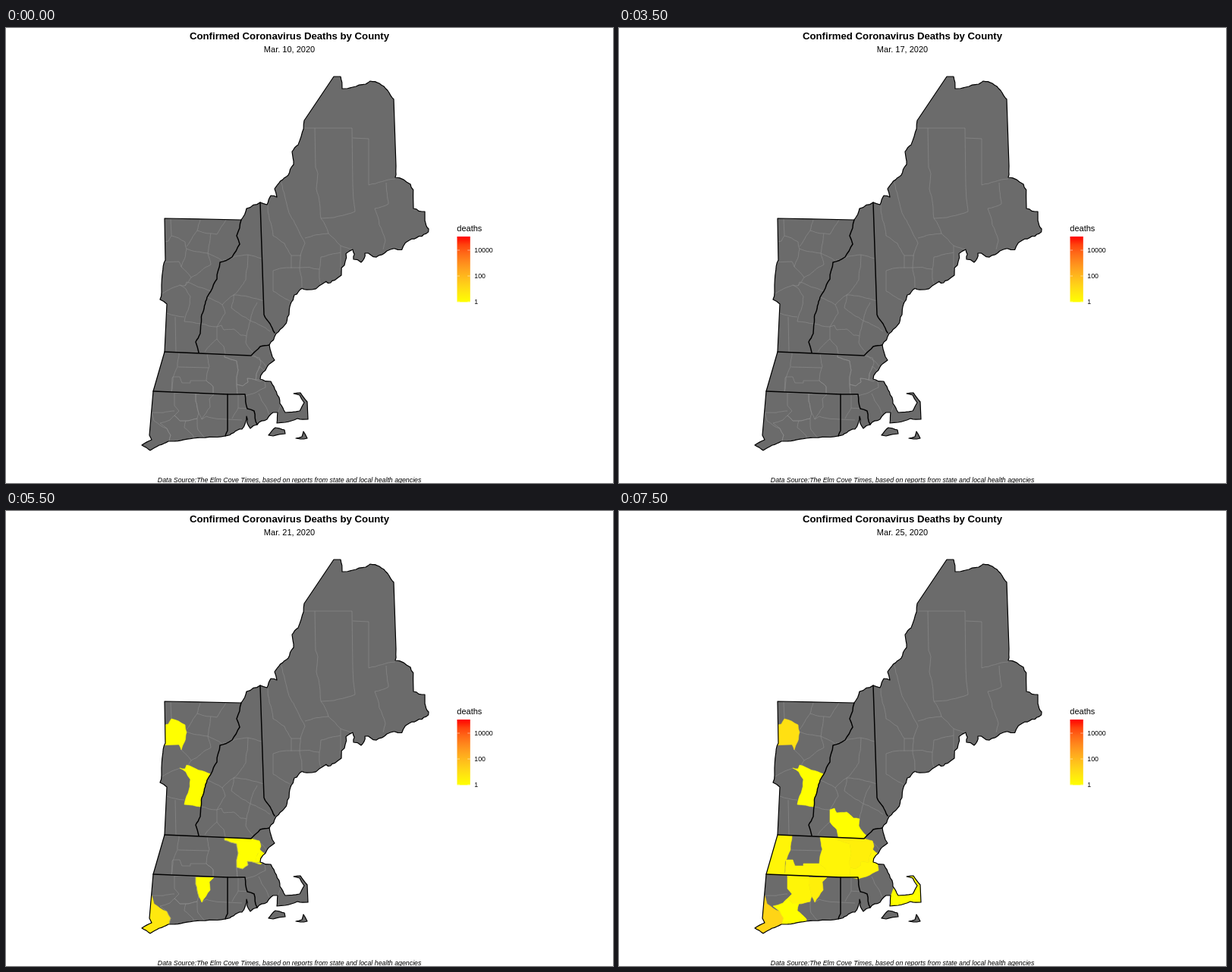
Animation, 800 px wide and 600 px high, one loop 8000 ms. Source, as an HTML page:

```html
<!DOCTYPE html>
<html lang="en">
<head>
<meta charset="utf-8">
<title>Deaths by county</title>
<style>
  html, body { margin: 0; width: 100%; height: 100%; overflow: hidden; background: #fff; }
  svg { display: block; width: 800px; height: 600px; }
  text { font-family: "Liberation Sans", Arial, sans-serif; fill: #000; }
  .mid { text-anchor: middle; }
  .land { fill: #6b6b6b; }
  .county { fill: none; stroke: #8f8f8f; stroke-width: .6; }
  .coast, .state { fill: none; stroke: #000; stroke-linejoin: round; stroke-linecap: round; }
  .coast { stroke-width: 1.2; }
  .state { stroke-width: 1.45; }
  .tick { stroke: #fff; stroke-width: .5; }
</style>
</head>
<body>
<svg viewBox="0 0 800 600">
  <defs>
    <clipPath id="shore"></clipPath>
    <linearGradient id="heat" x1="0" y1="1" x2="0" y2="0"></linearGradient>
  </defs>
  <g id="land"></g>
  <g id="counties" clip-path="url(#shore)"></g>
  <g id="borders"></g>
  <rect x="594.5" y="275" width="17.3" height="86.4" fill="url(#heat)"/>
  <g id="scale" font-size="8.8"></g>
  <text x="594.3" y="268" font-size="11">deaths</text>
  <text class="mid" x="373.6" y="599" font-size="8.8" font-style="italic">Data Source:The Elm Cove Times, based on reports from state and local health agencies</text>
  <text class="mid" x="373.5" y="15" font-size="13.2" font-weight="bold">Confirmed Coronavirus Deaths by County</text>
  <text id="date" class="mid" x="373.5" y="32" font-size="11"></text>
</svg>
<script>
const STEP = 500, LOOP = 8000, DECADES = 5.06;
const INLAND = .12;
const $ = id => document.getElementById(id);

// Key points of the shore, clockwise; each stretch has its own roughness
const shore = [
  [.2, '209,251 310,253 317,238 335,230 344,233 349,221 357,223 354,212 372,194 379,180 377,163 389,143 393,122'],
  [0, '432,64'],
  [.15, '441,64 443,80 457,78 474,74 480,70 492,73 511,94 514,182'],
  [.25, '513,197 533,206 537,238 552,242 557,265'],
  [.5, '535,278 502,294 473,297 468,309 458,305 457,292 442,326 403,345 380,352'],
  [.25, '373,378 356,403 347,418 354,438 344,447 335,463 349,466 361,495'],
  [.1, '368,507 387,505 393,494 387,484 379,482 388,481 397,493 398,516 384,515 368,520 357,521 358,507'],
  [.25, '352,507 344,516 331,523 322,528 317,512 311,529 289,538'],
  [.1, '247,541 214,545 190,557 179,550 192,543 189,537'],
  [0, '194,479 209,427'],
  [.15, '212,364 203,358 205,339 210,306 209,251']
];

const islands = [
  '346,537 355,527 367,530 368,535 352,538',
  '382,541 390,539 392,532 397,541 388,542'
];

const stateLines = [
  '310,253 304,274 308,285 298,302 282,309 278,331 270,347 265,355 258,378 257,390 256,403 250,414 254,428',
  '335,230 340,378 348,390 354,402',
  '209,427 323,432 335,420 347,418',
  '194,479 292,483 315,483 318,502 327,505 331,523',
  '292,483 292,531 289,538'
];

const countyLines = [
  // Maine
  '392,132 456,132 457,208 460,242 415,251 409,212 411,192 408,184 407,132',
  '457,145 478,146 478,207 513,199',
  '501,204 504,232 486,238 500,280 497,292',
  '363,204 372,240 386,268 394,284 388,300 387,316 352,320 352,347 378,362',
  '345,231 352,274 367,284 376,300 376,317',
  '415,251 425,271 394,277', '425,271 441,287 457,292', '376,300 389,300',
  '441,287 441,296 415,302 413,318 387,316 390,342', '413,318 415,338', '441,296 441,320',
  // Vermont
  '217,252 218,274', '256,253 252,267 238,288', '252,267 278,272 290,253',
  '238,291 266,297 270,271', '285,307 266,297 270,312 244,329 231,315',
  '244,329 236,340', '229,339 206,350', '212,376 235,381', '223,381 224,427',
  // New Hampshire
  '286,306 319,299 337,304', '319,299 316,332 300,352 285,365 265,355',
  '340,360 300,352 297,369 322,386 331,362', '285,365 289,376 278,394 257,390',
  '317,406 322,386 348,400', '278,410 262,427',
  // Southern states
  '227,447 267,448', '325,430 344,448', '333,482 343,500 350,515',
  '192,507 222,505', '237,518 252,515 253,530 262,541', '258,516 264,512 292,516 311,517',
  '306,484 306,501 318,502', '306,501 298,515'
];

// Outline (trimmed by the shore), first step with a death, then the count per step
const counties = [
  ['192,507 195,518 212,528 217,537 213,550 170,565 180,520', 8, [1, 4, 4, 5, 6, 8, 10, 18]],
  ['218,274 236,282 238,292 231,315 228,308 200,309 200,283 214,281', 9, [1, 1, 1, 1, 1, 1, 8]],
  ['229,339 236,340 238,335 270,347 265,355 258,378 257,390 235,387 240,372 243,354 237,344', 9, [1]],
  ['250,483 274,483 268,489 269,500 258,516 254,508 250,492', 10, [1, 1, 1, 1, 2, 3]],
  ['334,446 341,452 336,466 329,464 330,456', 10, [1, 1, 1, 1, 2]],
  ['288,431 323,432 334,435 336,442 330,456 329,464 318,462 319,467 312,472 304,470 306,451 304,439 288,434', 11, [1, 1, 1, 2, 3]],
  ['209,427 228,428 226,447 219,462 218,480 180,479 195,427', 12, [1, 1, 2]],
  ['218,480 220,460 229,460 232,468 243,468 243,465 264,465 273,473 273,482', 12, [1, 1, 1, 2]],
  ['222,481 250,482 250,492 254,508 252,515 237,518 229,518 222,511 228,505 222,498', 12, [1, 1, 2]],
  ['278,394 284,392 287,398 300,397 309,405 317,406 316,415 326,428 323,432 289,430 287,420 278,410', 13, [1]],
  ['265,430 288,431 288,434 304,439 306,451 304,470 305,483 273,482 273,473 264,465 268,446', 15, [2]],
  ['304,470 312,472 319,467 318,462 329,464 340,462 342,474 326,482 315,485 305,483', 15, [2]],
  ['361,500 358,508 352,525 405,525 405,470 370,470', 15, [1]],
  ['203,521 216,517 222,511 229,518 237,518 235,527 247,538 247,550 213,550 217,537 212,528', 15, [1]]
];

const parse = text => text.split(' ').map(pair => pair.split(',').map(Number));

function noise([ax, ay], [bx, by]) {
  const n = Math.sin(ax * 12.9 + ay * 78.2 + bx * 37.7 + by * 9.1) * 43758.5;
  return n - Math.floor(n) - .5;
}

// Splits a segment into a wavering line; both directions give the same curve.
// Nearly level or upright segments are surveyed borders and stay straight.
function waver(a, b, amount) {
  const dx = Math.abs(b[0] - a[0]), dy = Math.abs(b[1] - a[1]);
  const surveyed = dy < dx * .06 || dx < dy * .06;
  if (!amount || surveyed || Math.hypot(dx, dy) < 6) return [b];
  const [p, q] = a[0] < b[0] || (a[0] === b[0] && a[1] < b[1]) ? [a, b] : [b, a];
  const shift = noise(p, q) * amount;
  const mid = [
    (p[0] + q[0]) / 2 - (q[1] - p[1]) * shift,
    (p[1] + q[1]) / 2 + (q[0] - p[0]) * shift
  ];
  return [...waver(a, mid, amount), ...waver(mid, b, amount)];
}

function roughen(keys, amount) {
  return keys.slice(1).reduce((line, key, i) => line.concat(waver(keys[i], key, amount)), [keys[0]]);
}

const line = text => roughen(parse(text), INLAND);
function ring(text) {
  const keys = parse(text);
  return roughen([...keys, keys[0]], INLAND);
}

function add(parent, tag, attrs, text = '') {
  const el = document.createElementNS('http://www.w3.org/2000/svg', tag);
  for (const name in attrs) el.setAttribute(name, attrs[name]);
  el.textContent = text;
  return $(parent).appendChild(el);
}

// Yellow at 0, red at 1
function heat(t) {
  const green = 255 * (1 - t) ** .65;
  const blue = 120 * t * (1 - t);
  return `rgb(255,${Math.round(green)},${Math.round(blue)})`;
}

let mainland = [];
for (const [amount, text] of shore) {
  mainland = roughen([...mainland.slice(-1), ...parse(text)], amount)
    .reduce((all, point) => all.concat([point]), mainland.slice(0, -1));
}
for (const points of [mainland, ...islands.map(ring)]) {
  add('shore', 'polygon', { points });
  add('land', 'polygon', { points, class: 'land' });
  add('borders', 'polygon', { points, class: 'coast' });
}
for (const text of stateLines) add('borders', 'polyline', { points: line(text), class: 'state' });
for (const text of countyLines) add('counties', 'polyline', { points: line(text), class: 'county' });
const areas = counties.map(([text, from, counts]) => ({
  el: add('counties', 'polygon', { points: ring(text), class: 'county' }), from, counts
}));

for (let t = 0; t <= 1; t += .125) add('heat', 'stop', { offset: t, 'stop-color': heat(t) });
for (const power of [0, 2, 4]) {
  const y = 361 - power * 17;
  add('scale', 'path', { class: 'tick', d: `M594.5 ${y}h3.5m10.3 0h3.5` });
  add('scale', 'text', { x: 617.3, y: y + 3.2 }, 10 ** power);
}

function show(step) {
  $('date').textContent = `Mar. ${10 + step}, 2020`;
  for (const { el, from, counts } of areas) {
    const deaths = counts[Math.min(step - from, counts.length - 1)];
    const color = deaths ? heat(Math.log10(deaths) / DECADES) : '';
    el.style.fill = el.style.stroke = color;
  }
}

const start = performance.now();
let shown = -1;
function tick() {
  const step = Math.floor((performance.now() - start) % LOOP / STEP);
  if (step !== shown) show(shown = step);
  requestAnimationFrame(tick);
}
tick();
</script>
</body>
</html>
```
